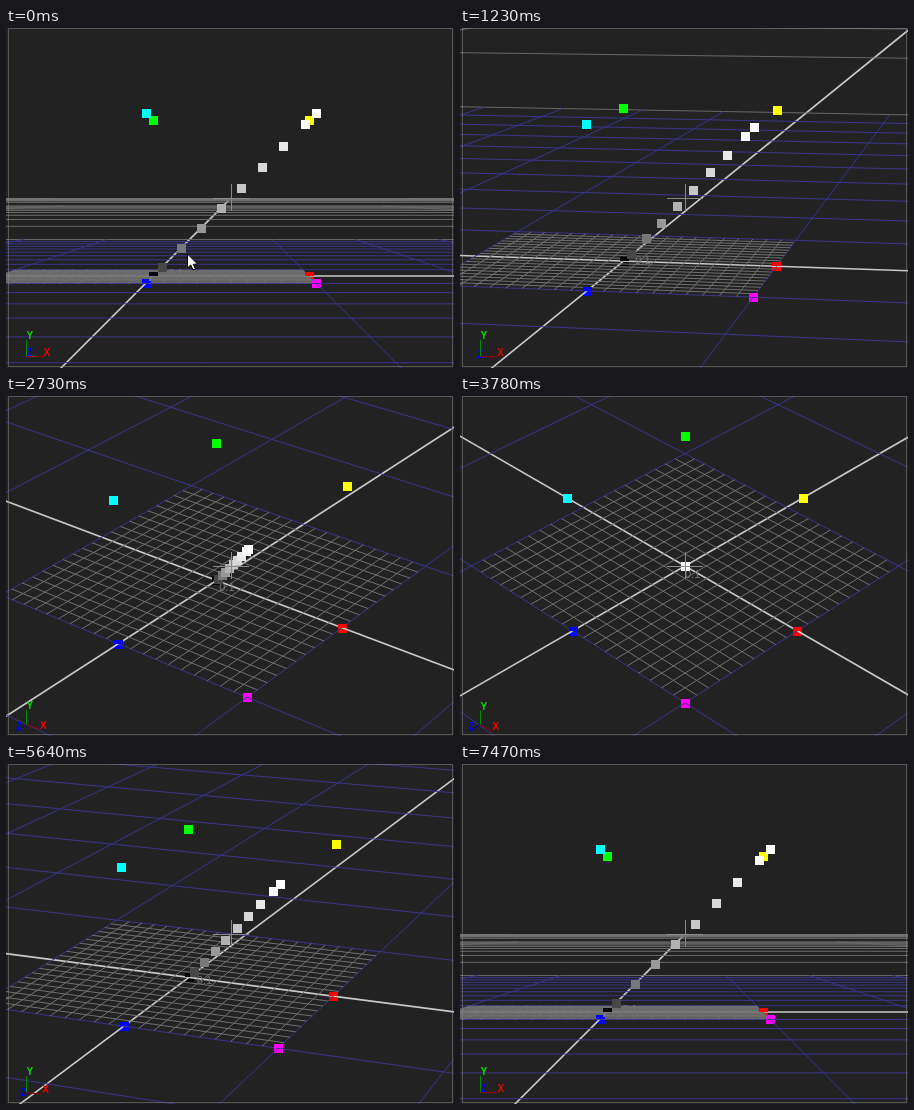
Recreate the animation shown at these times as an HTML page with a canvas. Size 448 px wide and 340 px high, loop 7500 ms.

```html
<!DOCTYPE html>
<html lang="en">
<head>
<meta charset="utf-8">
<title>Colour cube orbit</title>
<style>
html, body { margin: 0; width: 100%; height: 100%; overflow: hidden; background: #222; }
canvas { display: block; }
</style>
</head>
<body>
<canvas id="view" width="448" height="340"></canvas>
<script>
const ctx = document.getElementById('view').getContext('2d');
const LOOP = 7500, STEP = 30, HOLD = 25;
const CX = 225, CY = 170;          // screen position of the cube centre
const FOCAL = 1778, DIST = 10.9, NEAR = 2;
const AZ_MAX = Math.PI / 4, EL_MAX = Math.atan(Math.SQRT1_2);
const FONT = '"Liberation Sans", Arial, sans-serif';

// Grid tiers: line spacing, half extent and colour
const TIERS = [
  { step: 100, size: 1000, last: 10, color: '#747474' },
  { step: 10, size: 100, last: 9, color: '#6a6a6a' },
  { step: 1, size: 10, last: 9, color: '#38348c' },
  { step: 0.1, size: 1, last: 9, color: '#707070' }
];

const points = [];
for (let i = 0; i < 8; i++) {
  const p = [i & 1, i >> 1 & 1, i >> 2];
  points.push({ p, color: `rgb(${p.map(c => c * 255)})` });
}
for (let i = 0; i < 8; i++) {
  const v = (i + 0.5) / 8;
  const g = Math.round(255 * (1.055 * v ** (1 / 2.4) - 0.055));
  points.push({ p: [v, v, v], color: `rgb(${g},${g},${g})` });
}

let right, up, toward;
const dot = (a, b) => a[0] * b[0] + a[1] * b[1] + a[2] * b[2];

function aim(t) {
  const half = LOOP / 2;
  const u = Math.max(0, (half - Math.abs(t - half) - HOLD) / (half - HOLD));
  const k = (1 - Math.cos(Math.PI * u)) / 2;
  const az = AZ_MAX * k, el = EL_MAX * k;
  const sa = Math.sin(az), ca = Math.cos(az), se = Math.sin(el), ce = Math.cos(el);
  right = [ca, 0, -sa];
  up = [-sa * se, ce, -ca * se];
  toward = [sa * ce, se, ca * ce];
}

function toView(p) {
  const q = p.map(c => c - 0.5);
  return [dot(q, right), dot(q, up), DIST - dot(q, toward)];
}

const toScreen = v => [CX + FOCAL * v[0] / v[2], CY - FOCAL * v[1] / v[2]];

function clipNear(a, b) {
  if (a[2] >= NEAR) return a;
  const s = (NEAR - a[2]) / (b[2] - a[2]);
  return a.map((c, i) => c + (b[i] - c) * s);
}

function addLine(p, q) {
  const a = toView(p), b = toView(q);
  if (a[2] < NEAR && b[2] < NEAR) return;
  ctx.moveTo(...toScreen(clipNear(a, b)));
  ctx.lineTo(...toScreen(clipNear(b, a)));
}

function stroke(color, width, build) {
  ctx.strokeStyle = color;
  ctx.lineWidth = width;
  ctx.beginPath();
  build();
  ctx.stroke();
}

function drawFloor() {
  stroke('#cacaca', 1.6, () => {
    addLine([-1000, 0, 0], [1000, 0, 0]);
    addLine([0, 0, -1000], [0, 0, 1000]);
  });
  for (const { step, size, last, color } of TIERS) {
    stroke(color, 1, () => {
      for (let i = -last; i <= last; i++) {
        if (!i) continue;
        addLine([i * step, 0, -size], [i * step, 0, size]);
        addLine([-size, 0, i * step], [size, 0, i * step]);
      }
    });
  }
}

function drawPoints(list) {
  for (const s of list) {
    ctx.fillStyle = s.color;
    ctx.fillRect(s.x - 4, s.y - 4, 9, 9);
  }
}

function drawScene() {
  const sorted = points.map(({ p, color }) => {
    const v = toView(p), [x, y] = toScreen(v);
    return { x: Math.round(x), y: Math.round(y), z: v[2], low: p[1] === 0, color };
  }).sort((a, b) => b.z - a.z);
  const low = sorted.filter(s => s.low);

  drawFloor();
  drawPoints(low);
  // The nearer part of the floor passes in front of each ground point
  ctx.save();
  ctx.beginPath();
  for (const s of low) ctx.rect(s.x - 4, s.y, 9, 5);
  ctx.clip();
  drawFloor();
  ctx.restore();

  const [lx, ly] = toScreen(toView([0.1, 0, 0.1]));
  ctx.font = '11px ' + FONT;
  ctx.fillStyle = '#747474';
  ctx.fillText('0.1', lx, ly);

  drawPoints(sorted.filter(s => !s.low));
}

function drawGizmo() {
  const ox = 20.5, oy = 328.5, len = 17;
  const axes = [
    ['Z', 2, '#0000a0', '#0000ff'],
    ['X', 0, '#a00000', '#f00000'],
    ['Y', 1, '#008c00', '#00e000']
  ];
  ctx.font = 'bold 10px ' + FONT;
  for (const [name, i, dim, bright] of axes) {
    const x = ox + len * right[i], y = oy - len * up[i];
    stroke(dim, 1, () => {
      ctx.moveTo(ox, oy);
      ctx.lineTo(x, y);
    });
    ctx.fillStyle = bright;
    ctx.fillText(name, x, y - 1);
  }
}

function drawOverlay() {
  stroke('#8a8a8a', 1, () => {
    ctx.moveTo(207, 170.5);
    ctx.lineTo(243, 170.5);
    ctx.moveTo(225.5, 156);
    ctx.lineTo(225.5, 183);
  });
  ctx.setLineDash([1, 1]);
  stroke('#8c8c8c', 1, () => ctx.rect(2.5, 0.5, 444, 338));
  ctx.setLineDash([]);
}

function drawCursor(x, y) {
  const shape = [[0, 0], [0, 14], [3.2, 11], [5.6, 16], [8, 15], [5.8, 10.3], [10, 10]];
  ctx.beginPath();
  for (const [dx, dy] of shape) ctx.lineTo(x + dx, y + dy);
  ctx.closePath();
  ctx.fillStyle = '#fff';
  ctx.fill();
  ctx.strokeStyle = '#000';
  ctx.lineWidth = 1;
  ctx.stroke();
}

function frame() {
  const t = Math.floor(performance.now() % LOOP / STEP) * STEP;
  ctx.fillStyle = '#222';
  ctx.fillRect(0, 0, 448, 340);
  aim(t);
  drawScene();
  drawGizmo();
  drawOverlay();
  if (t < 1000) drawCursor(t < 300 ? 181.5 : 178.5, 226);
  requestAnimationFrame(frame);
}
frame();
</script>
</body>
</html>
```
